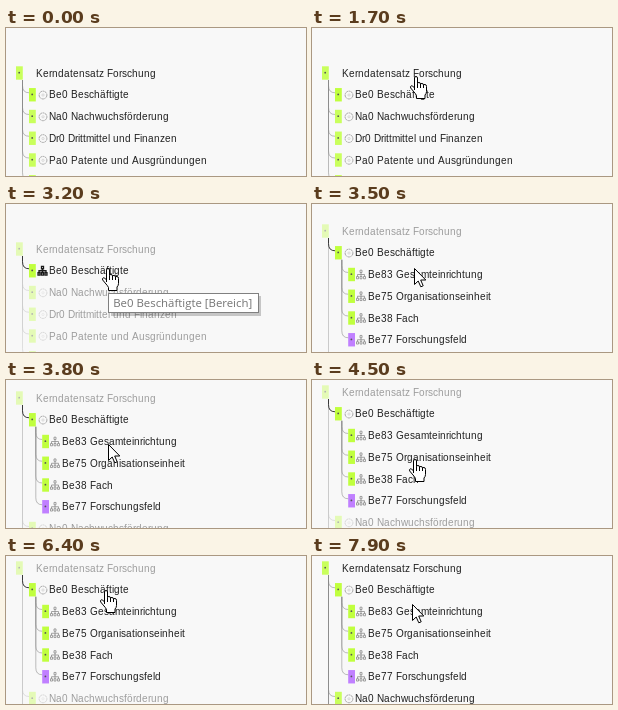
Recreate the animation shown at these times as an HTML page. Size 300 by 148 pixels, loop 8000 ms.

```html
<!DOCTYPE html>
<html lang="de">
<head>
<meta charset="utf-8">
<title>Kerndatensatz Forschung</title>
<style>
html, body { margin: 0; height: 100%; overflow: hidden; background: #f8f8f8; }
svg { display: block; width: 100vw; height: 100vh; }
text { font: 10px "Liberation Sans", Arial, sans-serif; fill: #202020; }
.link { fill: none; stroke: #888; stroke-opacity: .55; stroke-width: 1; }
.tip text { font: 11.4px "Open Sans", sans-serif; fill: #747474; }

#scene, #cursor, .tip, .dim, .open, .closed, .pick, .rest, .hot, .hand, .arrow {
  animation: 8s step-end infinite;
}
#scene { animation-name: scroll; }
#cursor { animation-name: move; }
.tip { animation-name: tip; }
.dim { animation-name: dim; }
.open { animation-name: open; }
.closed { animation-name: closed; }
.pick { animation-name: pick; }
.rest { animation-name: rest; }
.hot { animation-name: hot; }
.hand { animation-name: hand; }
.arrow { animation-name: arrow; }

@keyframes scroll {
  0% { transform: none; }
  40% { transform: translateY(0); animation-timing-function: steps(3); }
  43.75% { transform: translateY(-18px); animation-timing-function: steps(5); }
  50%, 100% { transform: translateY(-33px); }
}
@keyframes move {
  0% { transform: translate(104px, -20px); }
  10% { transform: translate(104px, -20px); animation-timing-function: steps(9); }
  21.25% { transform: translate(104px, 48px); animation-timing-function: steps(6); }
  28.75% { transform: translate(102px, 64px); }
  50% { transform: translate(102px, 64px); animation-timing-function: steps(5); }
  56.25% { transform: translate(103px, 79px); animation-timing-function: steps(4); }
  61.25% { transform: translate(103px, 105px); }
  62.5% { transform: translate(103px, 108px); animation-timing-function: steps(6); }
  70% { transform: translate(103px, 73px); animation-timing-function: steps(2); }
  72.5% { transform: translate(100px, 55px); animation-timing-function: steps(4); }
  77.5% { transform: translate(99px, 34px); }
  80% { transform: translate(100px, 34px); }
  95% { transform: translate(100px, 34px); animation-timing-function: steps(3); }
  98.75%, 100% { transform: translate(100px, 48px); }
}
@keyframes tip {
  0%, 41.25%, 100% { opacity: 0; }
  35% { opacity: .5; }
  36.25% { opacity: 1; }
}
@keyframes dim {
  0%, 86.25%, 100% { opacity: 1; }
  40% { opacity: .42; }
}
@keyframes open {
  0% { visibility: hidden; }
  41.25%, 100% { visibility: visible; }
}
@keyframes closed {
  0% { visibility: visible; }
  41.25%, 100% { visibility: hidden; }
}
@keyframes pick {
  0%, 41.25%, 100% { visibility: hidden; }
  40% { visibility: visible; }
}
@keyframes rest {
  0%, 41.25%, 100% { visibility: visible; }
  40% { visibility: hidden; }
}
@keyframes hot {
  0%, 86.25%, 100% { stroke: #888; stroke-opacity: .55; }
  40% { stroke: #383838; stroke-opacity: 1; }
}
@keyframes hand {
  0%, 23.75%, 41.25%, 57.5%, 66.25%, 71.25%, 75%, 97.5%, 100% { visibility: hidden; }
  20%, 27.5%, 53.75%, 60%, 68.75%, 72.5%, 76.25% { visibility: visible; }
}
@keyframes arrow {
  0%, 23.75%, 41.25%, 57.5%, 66.25%, 71.25%, 75%, 97.5%, 100% { visibility: visible; }
  20%, 27.5%, 53.75%, 60%, 68.75%, 72.5%, 76.25% { visibility: hidden; }
}
</style>
</head>
<body>
<svg viewBox="0 0 300 148">
  <defs>
    <g id="ring" fill="none" stroke="#9c9c9c">
      <circle r="3.9" stroke-width=".9" stroke-dasharray="2 .5"/>
      <circle r="1.1" stroke="#ccc" stroke-width=".7"/>
    </g>
    <path id="org" fill="none" stroke="currentColor"
      d="M0-2V2M-3.5 2V0H3.5V2M-1-4.3h2v2.3h-2zM-4.5 2h2v2.3h-2zM-1 2h2v2.3h-2zM2.5 2h2v2.3h-2z"/>
  </defs>
  <g id="scene"></g>
  <g class="tip">
    <rect x="105" y="92" width="150" height="20" fill="#000" opacity=".2"/>
    <rect x="102.5" y="89.5" width="150" height="19" fill="#fff" stroke="#808080"/>
    <text x="107.2" y="103">Be0 Beschäftigte [Bereich]</text>
  </g>
  <g id="cursor" stroke="#000" fill="#fff" stroke-linejoin="round">
    <path class="arrow" d="M.5.5V16.5L4.2 13L6.8 18.8L9.2 17.8L6.7 12H11.8Z"/>
    <g class="hand">
      <path transform="translate(-6.5)" d="M5 14V2Q5 .5 6.5 .5T8 2V7.5Q8 6.5 9.5 6.5T11 8Q11 7.5 12.5 7.5T14 9Q14 8.5 15.5 8.5T17 10.5V15.5Q17 17.5 15.5 19V22.5H7V19.5Q6 17.5 4.5 16L1.2 12Q.5 10.5 1.7 9.8T5 12"/>
      <path transform="translate(-6.5)" fill="none" d="M8 7.5V12M11 8V12M14 9V12"/>
    </g>
  </g>
</svg>
<script>
const GREEN = '#c0ff3e', PALE_GREEN = '#c9ff5c', PURPLE = '#c080ff';
const rowY = index => 45 + index * 21.75;

const ruler = document.createElement('canvas').getContext('2d');
ruler.font = '10px "Liberation Sans", Arial, sans-serif';

const group = (cls, content) => `<g class="${cls}">${content}</g>`;
const icon = (id, x, y, color = '#8c8c8c', weight = .8) =>
  `<use href="#${id}" x="${x}" y="${y}" color="${color}" stroke-width="${weight}"/>`;

// Glyphs advance by whole pixels, as in classic hinted screen text.
const label = (x, y, text) => {
  const stops = [];
  for (const char of text) {
    stops.push(x);
    x += Math.round(ruler.measureText(char).width);
  }
  return `<text x="${stops.join(' ')}" y="${Math.round(y + 3.6)}">${text}</text>`;
};

const box = (x, y, color) =>
  `<rect x="${x}" y="${y - 6.7}" width="6.8" height="13.4" fill="${color}"/>` +
  `<circle cx="${x + 3.2}" cy="${y - .3}" r=".9" fill="#555"/>`;

// Link from the foot of a parent box, bending into the child box.
const link = (x, from, y, cls = '') =>
  `<path class="link ${cls}" d="M${x} ${from + 7}V${y - 9}Q${x} ${y - 2} ${x + 6.5} ${y - 2}"/>`;

const branch = (index, text) => {
  const y = rowY(index);
  return link(16.5, rowY(0), y) + box(23, y, PALE_GREEN) +
    icon('ring', 37, y + .3) + label(43, y, text);
};

const leaf = (index, text, color = GREEN) => {
  const y = rowY(index);
  return link(29.8, rowY(1), y) + box(36.2, y, color) + icon('org', 49, y) + label(56, y, text);
};

const siblings = ['Na0 Nachwuchsförderung', 'Dr0 Drittmittel und Finanzen',
  'Pa0 Patente und Ausgründungen', ''];
const siblingsFrom = first => siblings.map((text, i) => branch(first + i, text)).join('');
const y1 = rowY(1);

document.getElementById('scene').innerHTML =
  group('dim', group('closed', siblingsFrom(2)) + group('open', siblingsFrom(6))) +
  link(16.5, rowY(0), y1, 'hot') +
  group('dim', box(10, rowY(0), PALE_GREEN) + label(30, rowY(0), 'Kerndatensatz Forschung')) +
  box(23, y1, GREEN) +
  group('rest', icon('ring', 37, y1 + .3)) +
  group('pick', icon('org', 36.5, y1, '#181818', 1.3)) +
  label(43, y1, 'Be0 Beschäftigte') +
  group('open',
    leaf(2, 'Be83 Gesamteinrichtung') +
    leaf(3, 'Be75 Organisationseinheit') +
    leaf(4, 'Be38 Fach') +
    leaf(5, 'Be77 Forschungsfeld', PURPLE));
</script>
</body>
</html>
```
